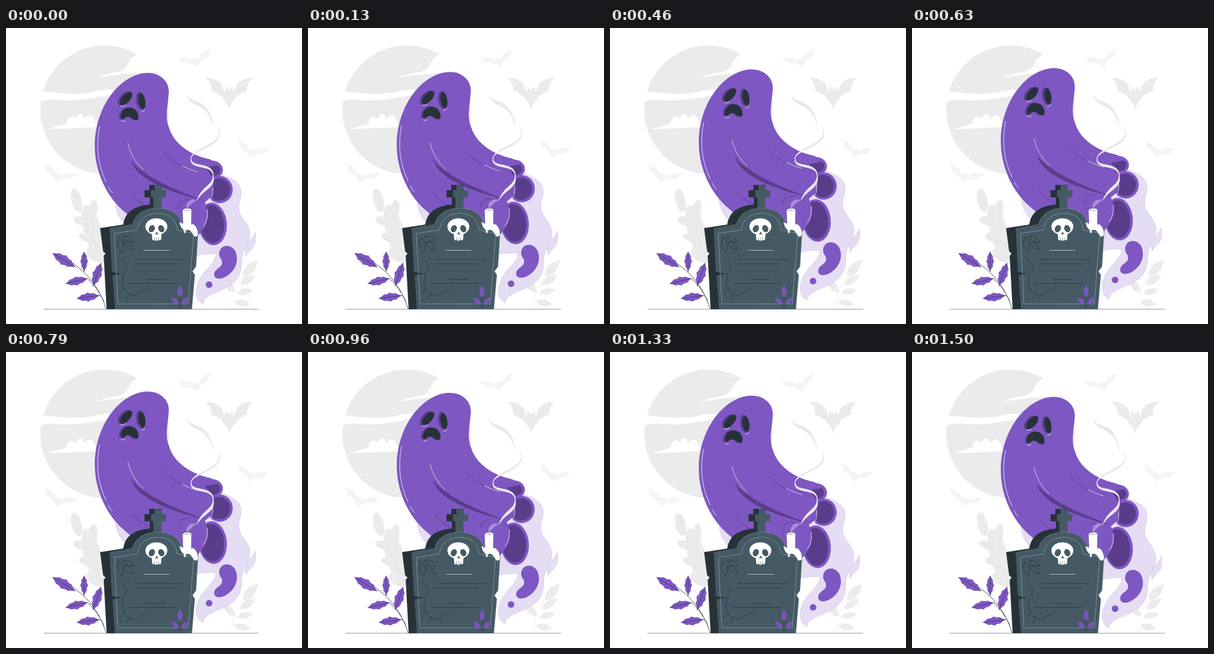
Animation of 500x500 px, one loop 1.54 s. Source, as an HTML page with a canvas:

```html
<!DOCTYPE html>
<html lang="en">
<head>
<meta charset="utf-8">
<title>Sad ghost</title>
<style>
html, body { margin: 0; width: 100%; height: 100%; overflow: hidden; background: #fff; }
canvas { display: block; width: 500px; height: 500px; }
</style>
</head>
<body>
<canvas id="stage" width="500" height="500"></canvas>
<script>
const ctx = document.getElementById('stage').getContext('2d');
const WHITE = '#fff', PURPLE = '#7e57c2', DEEP = '#5a3d8a', LILAC = '#e5ddf3';
const INK = '#263238', SLATE = '#455a64', GREY = '#ebebeb', PALE = '#f4f4f4';
const LOOP = 1540, FRAMES = 37, HALF = 18, RISE = 9.7;

const toPath = p => typeof p === 'string' ? new Path2D(p) : p;

function fill(color, path) {
  ctx.fillStyle = color;
  ctx.fill(toPath(path));
}

function line(color, path, width = 0.8, dash = []) {
  ctx.strokeStyle = color;
  ctx.lineWidth = width;
  ctx.setLineDash(dash);
  ctx.stroke(toPath(path));
  ctx.setLineDash([]);
}

function oval(color, x, y, rx, ry, deg = 0) {
  ctx.fillStyle = color;
  ctx.beginPath();
  ctx.ellipse(x, y, rx, ry, deg * Math.PI / 180, 0, Math.PI * 2);
  ctx.fill();
}

function placed(x, y, deg, sx, sy, draw) {
  ctx.save();
  ctx.translate(x, y);
  ctx.rotate(deg * Math.PI / 180);
  ctx.scale(sx, sy);
  draw();
  ctx.restore();
}

// Cubic stroke that swells towards its middle.
function ribbon(color, width, p0, p1, p2, p3) {
  const at = t => [0, 1].map(k => {
    const s = 1 - t;
    return s * s * s * p0[k] + 3 * s * s * t * p1[k] + 3 * s * t * t * p2[k] + t * t * t * p3[k];
  });
  for (let t = 0; t < 1; t += 1 / 24) {
    line(color, `M${at(t)}L${at(t + 1 / 24)}`, 1 + width * Math.sin(Math.PI * t));
  }
}

// Unit leaf, 100 long: each side is a row of arcs meeting in spikes.
function leafShape(spikes, height) {
  const path = new Path2D();
  for (const side of [-1, 1]) {
    path.moveTo(0, 0);
    for (let i = 1; i <= spikes; i++) {
      const u = i / spikes, mid = u - 0.55 / spikes;
      const rim = Math.sin(Math.PI * Math.min(u, 1)) * height;
      const dip = Math.sin(Math.PI * mid) * height * (spikes > 1 ? 0.6 : 2);
      path.quadraticCurveTo(mid * 100, side * dip, u * 100, side * rim);
    }
  }
  return path;
}
const HOLLY = leafShape(4, 20), LEAF = leafShape(1, 20);

function leaf(shape, color, vein, x1, y1, x2, y2) {
  const dx = x2 - x1, dy = y2 - y1, s = Math.hypot(dx, dy) / 100;
  placed(x1, y1, Math.atan2(dy, dx) * 180 / Math.PI, s, s, () => {
    fill(color, shape);
    line(vein, 'M0 0H90', 0.6 / s);
  });
}

const HALF_BAT = new Path2D('M-.3 -4H2L6 -10L7 0Q11 -4 11 -10Q19 -24 40 -24Q29 -15 30 -1Q23 -1 19 4Q12 5 10 13Q4 16 -.3 30Z');

function bat(color, x, y, deg, sx, sy) {
  for (const side of [-1, 1]) placed(x, y, deg, sx * side, sy, () => fill(color, HALF_BAT));
}
// Mirroring happens after rotation, so both wings share one tilt.

function drawMoon() {
  oval(GREY, 166.5, 138, 108.5, 108.5);
  fill(WHITE, 'M230 30L222 44Q211 49 207 60Q202 71 190 74Q168 77 152 84Q200 76 256 74L290 60Z');
  fill(WHITE, 'M56 106Q110 114 144 109Q160 104 180 104V112Q130 124 90 122Q68 119 56 126Z');
  fill(WHITE, 'M70 171Q88 165 102 162Q103 151 109 150Q115 149 117 154Q123 143 129 146Q131 149 131 155Q138 146 144 148Q150 152 152 163L175 166Q130 169 70 171Z');
}

function drawOak() {
  oval(GREY, 119, 291, 8.5, 20, -14);
  oval(GREY, 146, 309, 8, 19, 10);
  oval(GREY, 126, 326, 13, 7, 20);
  oval(GREY, 137, 354, 14, 7, 15);
  oval(GREY, 152, 384, 18, 10, 30);
  oval(GREY, 147, 345, 15, 48, -16);
  line('#e0e0e0', 'M117 280Q130 320 164 390M115 325L138 333M149 297L146 344M126 352L153 367', 0.6);
}

function drawBackdrop() {
  drawMoon();
  bat(GREY, 377, 108, 0, 1, 1);
  bat(PALE, 321, 54, -15, 0.77, 0.46);
  bat(PALE, 415, 207, 16, 0.73, 0.45);
  bat(PALE, 89, 249, 18, 0.79, 0.47);
  drawOak();
  line(GREY, 'M381 473Q382 429 425 391');
  for (let i = 0; i < 4; i++) {
    leaf(LEAF, GREY, PALE, 400 - i * 5, 420 + i * 14, 425 - i * 4, 392 + i * 25);
  }
  leaf(LEAF, GREY, PALE, 386, 447, 366, 423);
}

const HAZE = new Path2D('M184 292Q186 320 205 335L323 384Q345 380 355 382C352 405 325 410 321 445Q322 462 333 466C335 440 400 450 398 395C398 375 413 365 412 345C408 322 385 318 396 288C402 262 385 256 364 247Z');
const DROP = new Path2D('M421 345C425 375 411 371 406 385C400 362 415 362 421 345Z');
const KIDNEY = new Path2D('M360 381C361 362 390 363 390 389C391 415 358 432 352 419C350 405 366 407 365 395C365 390 360 389 360 381Z');
const BODY = new Path2D('M237 76C262 75 276 92 275 108C274 130 268 148 275 167C282 193 308 214 345 222L362 231L336 236Q354 254 350 272Q348 287 336 294Q349 325 325 350L250 355L203 313C168 285 150 240 150 200C150 130 195 78 237 76Z');
const MOUTH = new Path2D('M194 152C193 130 222 128 224 150Q224 159 215 154Q207 146 200 153Q195 156 194 152Z');

function lobe(x, y, rx, ry, deg) {
  oval(PURPLE, x, y, rx, ry, deg);
  oval(DEEP, x - 1, y, rx - 3.5, ry - 4, deg);
}

function drawFace() {
  oval(DEEP, 200.5, 119.5, 14.5, 8.5, -48);
  oval(INK, 203, 119, 13.5, 6.7, -48);
  oval(DEEP, 227.5, 123, 7.5, 15, -9);
  oval(INK, 229.6, 123.5, 5.7, 13.5, -9);
  placed(-3, 0, 0, 1, 1, () => fill(DEEP, MOUTH));
  fill(INK, MOUTH);
  line(WHITE, 'M193 132Q199 133 202 130M229 141Q233 141 235 138M195 157Q198 159 201 157');
}

function drawGhost(rise) {
  ctx.save();
  ctx.translate(0, -rise);
  for (const shape of [HAZE, DROP]) {
    fill(LILAC, shape);
    line('#c5b3e3', shape, 0.6, [1, 1]);
  }
  fill(PURPLE, KIDNEY);
  oval(PURPLE, 343, 433.5, 5.6, 5.5);
  lobe(349, 331, 24, 36, -5);
  lobe(361, 273, 22, 23, 0);
  lobe(349, 239, 17.5, 15, 10);
  fill(PURPLE, BODY);
  fill(DEEP, 'M211 222Q228 253 336 292Q220 264 211 222Z');
  line(DEEP, 'M206 195Q211 224 244 253M266 210Q291 237 326 242M214 282Q225 296 240 303M291 304Q292 288 311 290', 1);
  line(WHITE, 'M206 195Q211 220 232 240M298 233Q312 240 324 243M158 166Q148 217 169 260M173 268Q176 276 180 278M349 270Q351 289 340 294M340 307Q342 325 333 335');
  drawFace();
  ctx.restore();
}

function drawPlant() {
  line(INK, 'M169 474Q151 413 88 383M132 411V382M148 434L159 403M138 424Q150 434 157 447M158 451Q163 454 165 462');
  [[117, 404, 78, 380], [132, 411, 132, 377], [147, 436, 161, 396],
   [138, 423, 100, 432], [158, 452, 119, 457]]
    .forEach(ends => leaf(HOLLY, PURPLE, INK, ...ends));
}

function drawSkull() {
  oval(WHITE, 254, 335.5, 18.5, 14, 0);
  fill(WHITE, 'M246 343H263L262 357Q260 360 257 358Q254 361 251 358Q248 360 247 357Z');
  for (const side of [-1, 1]) oval(SLATE, 254.3 + side * 8, 339, 5, 6.3, side * -25);
  fill(SLATE, 'M254.5 344L257.5 349L254.5 348L251.5 349Z');
  line(SLATE, 'M251 354V358M254.5 354V358M258 354V358', 0.6);
}

// Slim teardrop outlines scratched into the stone.
function scratch(x, y, deg, length) {
  placed(x, y, deg, length / 100, length / 100, () => line(INK, LEAF, 80 / length));
}

function drawStone() {
  fill(INK, 'M242 265H263V274H270V286H262V303H243V286H234V274H242Z');
  fill(INK, 'M159 338L198 332Q202 301 244 298H262V475H170L165 385L168 381L164 377Z');
  fill(SLATE, 'M251 265L263 266V274H271L270 286H262L263 304H249V286H245V274H251Z');
  fill(SLATE, 'M175 338L214 331Q221 305 258 304Q292 306 297 332L325 338L321 403L315 411L319 417L314 475H184L180 418L195 415L179 412Z');
  line('#90a4ae', 'M214 331Q221 305 258 304Q292 306 297 332M325 338L321 403M319 417L314 475', 0.5);
  line('#b0bec5', 'M183 347L222 341Q226 314 257 313Q286 314 289 341L317 347L308 466H189Z', 0.7, [2, 1.5]);
  drawSkull();

  line('#cfd8dc', 'M233 375.5H276');
  line(INK, 'M218 391H300M215 398.5H288M238 424.5H270M208 431.5H288');
  line(INK, 'M193 389Q208 399 203 408Q196 414 198 423Q193 433 200 439Q199 447 209 448Q216 457 225 446Q236 445 243 436M200 439L192 449M209 448L204 457');
  scratch(191, 354, 80, 25);
  scratch(198, 352, 28, 20);
  scratch(199, 361, 40, 21);

  line(INK, 'M294 474V445M293 470L283 458M295 470L306 458', 0.7);
  leaf(LEAF, PURPLE, DEEP, 294, 455, 294, 434);
  for (const side of [-1, 1]) leaf(LEAF, PURPLE, DEEP, 294 + side * 2, 467, 294 + side * 15, 455);
}

function drawCandle() {
  const wax = 'M293 328Q308 336 316 331Q325 337 324 350Q319 356 315 347Q309 338 304 342Q296 342 293 328Z';
  line(WHITE, 'M302 338V345', 3);
  fill(WHITE, wax);
  line('#b0bec5', wax, 0.4);
  fill(WHITE, 'M298 307Q305 302 313.5 306L313 333Q306 336 299 332Z');
  line(INK, 'M298 307Q305 302 313.5 306Q308 311 298 307M306 308V303M298 308L299 330M313.5 308L313 329', 0.4);
}

function drawWisps() {
  const smoke = '#ebe8ec', turn = [313, 218], bend = [350, 248], wick = [324, 288];
  ribbon(smoke, 5, [306, 114], [315, 134], [337, 119], [349, 160]);
  ribbon(smoke, 2.5, [358, 167], [373, 197], [321, 201], turn);
  ribbon(smoke, 3, turn, [308, 240], [347, 226], bend);
  ribbon(smoke, 4, bend, [352, 268], [335, 268], wick);
  ribbon('#a98fd6', 5, [322, 291], [312, 291], [307, 298], [306, 304]);
}

function render() {
  // Linear rise and fall in 36 steps, then one still step at the bottom.
  const step = Math.floor((performance.now() % LOOP + 5) * FRAMES / LOOP) % FRAMES;
  const rise = RISE * (1 - Math.abs(step - HALF) / HALF);
  fill(WHITE, 'M0 0H500V500H0Z');
  ctx.lineCap = ctx.lineJoin = 'round';
  drawBackdrop();
  drawGhost(rise);
  line('#8c9194', 'M64 475H427', 1);
  drawPlant();
  drawStone();
  drawCandle();
  drawWisps();
  requestAnimationFrame(render);
}
render();
</script>
</body>
</html>
```
